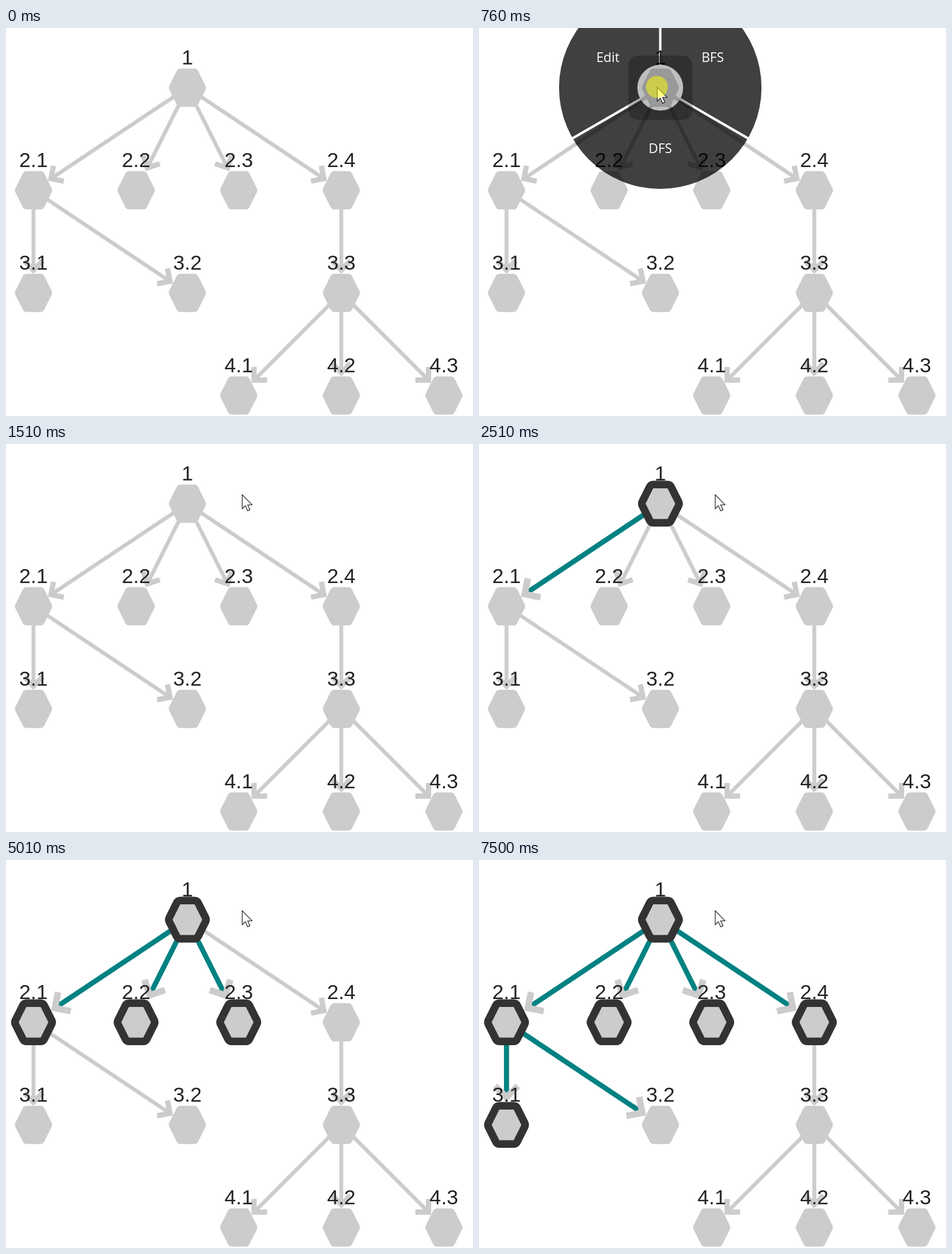
Write an HTML page that moves like this. It is 769 by 639 pixels and loops after 8000 ms.

```html
<!DOCTYPE html>
<html lang="en">
<head>
<meta charset="utf-8">
<title>Breadth-first search</title>
<style>
  html, body { margin: 0; width: 100%; height: 100%; overflow: hidden; background: #fff; }
  svg { display: block; width: 100%; height: 100%; }
  .label { font: 33.8px "Liberation Sans", Arial, sans-serif; fill: #222; text-anchor: middle; }
  .item { font: 21.5px "Open Sans", "Noto Sans", sans-serif; fill: #fff; text-anchor: middle; }
</style>
</head>
<body>
<svg id="stage" viewBox="0 0 769 639">
  <defs>
    <mask id="hole" maskUnits="userSpaceOnUse" x="-200" y="-200" width="400" height="400">
      <rect x="-200" y="-200" width="400" height="400" fill="#fff"/>
      <circle r="37.7"/>
      <rect id="pointer" x="17" y="-17.5" width="35" height="35"/>
    </mask>
    <mask id="gaps" maskUnits="userSpaceOnUse" x="-200" y="-200" width="400" height="400">
      <rect x="-200" y="-200" width="400" height="400" fill="#fff"/>
      <path d="M0 0V-200M0 0L173.2 100M0 0L-173.2 100" stroke="#000" stroke-width="4"/>
    </mask>
  </defs>
  <g id="edges"></g>
  <g id="nodes"></g>
  <rect id="press" x="246" y="45.5" width="105.5" height="106" rx="16" fill-opacity=".25"/>
  <g id="menu" transform="translate(298.5 98.3)">
    <g mask="url(#hole)">
      <circle r="166.7" fill-opacity=".75" mask="url(#gaps)"/>
      <path id="wedge" d="M0 0V-193.5A193.5 193.5 0 0 1 167.6 96.75Z" fill="#0169d9" fill-opacity=".75"/>
    </g>
    <text class="item" x="-86.3" y="-42">Edit</text>
    <text class="item" x="86.3" y="-42">BFS</text>
    <text class="item" x="0" y="107.5">DFS</text>
  </g>
  <g id="cursor">
    <path d="M.5 .5V23.5L5.6 18.6L9.4 27L13.2 25.3L9.5 17.2H16.6Z" fill="#fff" stroke="#111" stroke-width="1.1"/>
    <circle id="click" r="18" fill="#ff0" fill-opacity=".5"/>
  </g>
</svg>
<script>
const LOOP = 8000, STEP = 168.95, BORDER = 6.3;
const ROOT5 = Math.sqrt(5);
const HALF = 31.5, SIDE = 2 * HALF / ROOT5, ROUND = 7;

// label, column, row, parent index; listed in visiting order
const tree = [
  ["1", 1.5, 0], ["2.1", 0, 1, 0], ["2.2", 1, 1, 0], ["2.3", 2, 1, 0], ["2.4", 3, 1, 0],
  ["3.1", 0, 2, 1], ["3.2", 1.5, 2, 1], ["3.3", 3, 2, 4],
  ["4.1", 2, 3, 7], ["4.2", 3, 3, 7], ["4.3", 4, 3, 7]
];

const $ = id => document.getElementById(id);
const show = (el, on) => el.setAttribute("visibility", on ? "inherit" : "hidden");
const set = (el, attrs) => {
  for (const key in attrs) el.setAttribute(key, attrs[key]);
  return el;
};
const add = (parent, tag, attrs) =>
  parent.appendChild(set(document.createElementNS("http://www.w3.org/2000/svg", tag), attrs));

// Hexagon offset by grow, corners rounded by the stroke
function hexagon(parent, grow, color) {
  const r = Math.max(ROUND + grow, 0.7);
  const y = HALF + grow - r, reach = (SIDE + grow - r) * ROOT5;
  const a = reach / 2, b = (reach - y) / 2;
  return add(parent, "path", {
    d: `M${-a} 0L${-b} ${-y}H${b}L${a} 0L${b} ${y}H${-b}Z`,
    fill: color, stroke: color, "stroke-width": 2 * r, "stroke-linejoin": "round"
  });
}

// Distance from a node's centre to its outline along a direction
function outline(dx, dy, lit) {
  const grow = lit ? BORDER : 0;
  return Math.min((HALF + grow) / Math.abs(dy),
                  (SIDE + grow) * ROOT5 / (2 * Math.abs(dx) + Math.abs(dy)));
}

const nodes = tree.map(([label, col, row, parent]) => {
  const x = 45.3 + col * STEP, y = 98.3 + row * STEP;
  const g = add($("nodes"), "g", { transform: `translate(${x} ${y})` });
  hexagon(g, 0, "#ccc");
  const ring = add(g, "g", {});
  hexagon(ring, BORDER, "#333");
  hexagon(ring, -BORDER, "#ccc");
  add(g, "text", { class: "label", y: -38.6 }).textContent = label;
  return { x, y, ring, parent };
});

for (const node of nodes.slice(1)) {
  node.line = add($("edges"), "line", { "stroke-linecap": "round" });
  node.arrow = add($("edges"), "path", { fill: "#ccc" });
}

function drawEdge(from, to, lit, fromLit, toLit) {
  const dx = to.x - from.x, dy = to.y - from.y, len = Math.hypot(dx, dy);
  const ux = dx / len, uy = dy / len;
  const start = outline(ux, uy, fromLit), end = len - outline(ux, uy, toLit);
  const stop = end - (lit ? 19.3 : 12);
  set(to.line, {
    x1: from.x + ux * start, y1: from.y + uy * start,
    x2: from.x + ux * stop, y2: from.y + uy * stop,
    stroke: lit ? "#008282" : "#ccc", "stroke-width": lit ? 8.4 : 6.3
  });
  const s = lit ? 7.55 : 6.1;
  const angle = Math.atan2(uy, ux) * 180 / Math.PI;
  set(to.arrow, {
    d: "M0 0L-3 -3L-4 -2L-2 0L-4 2L-3 3Z",
    transform: `translate(${from.x + ux * end} ${from.y + uy * end}) rotate(${angle}) scale(${s})`
  });
}

const stepTime = i => (i < 9 ? 2010 : 2000) + 500 * i;

function cursorAt(t) {
  if (t < 1010) return [293, 97];
  if (t < 1135) return [322, 92];
  if (t < 1260) return [366, 86];
  return [388.5, 83];
}

function draw(t) {
  const lit = nodes.map((_, i) => t >= stepTime(2 * i));
  nodes.forEach((node, i) => {
    show(node.ring, lit[i]);
    if (i) drawEdge(nodes[node.parent], node, t >= stepTime(2 * i - 1), lit[node.parent], lit[i]);
  });

  const [x, y] = cursorAt(t);
  const held = t >= 130 && t < 1510, chosen = t >= 1135;
  show($("press"), held);
  show($("menu"), t >= 630 && held);
  show($("wedge"), chosen);
  show($("pointer"), chosen);
  const aim = Math.atan2(y - 98.3, x - 298.5) * 180 / Math.PI;
  $("pointer").setAttribute("transform", `rotate(${aim}) rotate(45 34.5 0) translate(-7.3 7.3)`);
  // keep the square's outer corner 52 from the centre
  $("pointer").setAttribute("transform", `rotate(${aim}) translate(27.3 0) rotate(45) translate(-34.5 0)`);
  show($("cursor"), t >= 130);
  show($("click"), held);
  $("cursor").setAttribute("transform", `translate(${x} ${y})`);
}

const begin = performance.now();
function tick(now) {
  draw(Math.max(0, now - begin) % LOOP);
  requestAnimationFrame(tick);
}
draw(0);
requestAnimationFrame(tick);
</script>
</body>
</html>
```
